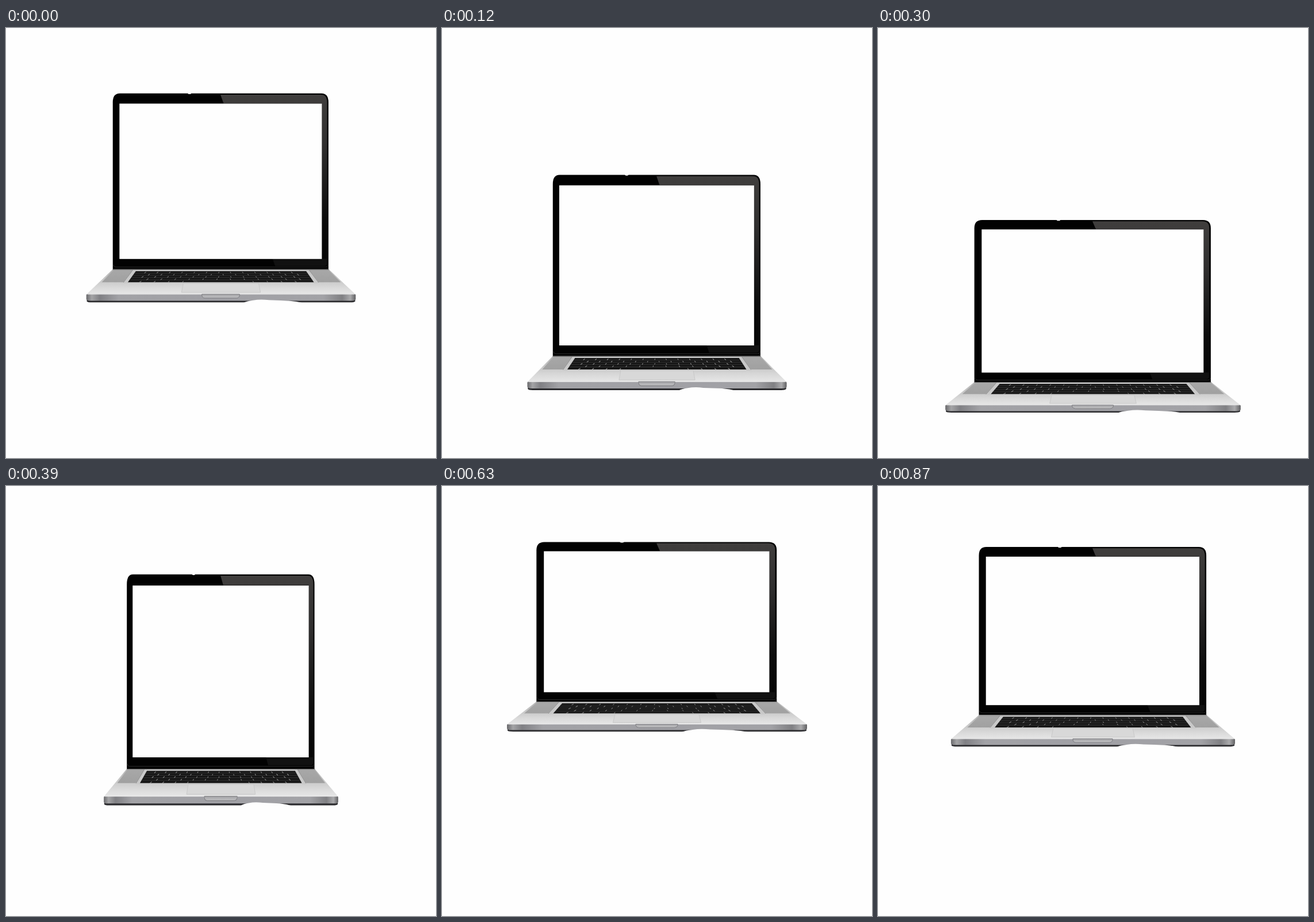
Animation of 748x748 px, one loop 0.9 s. Source, as an HTML page:

```html
<!DOCTYPE html>
<html lang="en">
<head>
<meta charset="utf-8">
<title>Bouncing laptop</title>
<style>
  html, body { margin: 0; width: 100%; height: 100%; overflow: hidden; background: #fefefe; }
  svg { display: block; width: 100%; height: 100%; }
</style>
</head>
<body>
<svg viewBox="0 0 748 748">
  <defs>
    <linearGradient id="gloss" x1="0" y1="0" x2="0" y2="1">
      <stop offset="0" stop-color="#403e3d"/>
      <stop offset=".3" stop-color="#302f2f"/>
      <stop offset=".75" stop-color="#0c0c0c"/>
      <stop offset="1" stop-color="#050505"/>
    </linearGradient>
    <linearGradient id="deck" x1="0" y1="0" x2="0" y2="1">
      <stop offset="0" stop-color="#b4b4b4"/>
      <stop offset=".5" stop-color="#cbcbcb"/>
      <stop offset=".75" stop-color="#dadada"/>
      <stop offset="1" stop-color="#e6e6e6"/>
    </linearGradient>
    <linearGradient id="side" x1="0" y1="0" x2="0" y2="1">
      <stop offset="0" stop-color="#a8a8a8"/>
      <stop offset="1" stop-color="#a0a0a0"/>
    </linearGradient>
    <linearGradient id="front">
      <stop offset="0" stop-color="#6a6a6d"/>
      <stop offset=".02" stop-color="#a4a4a6"/>
      <stop offset=".05" stop-color="#808084"/>
      <stop offset=".12" stop-color="#a2a2a6"/>
      <stop offset=".5" stop-color="#a0a0a5"/>
      <stop offset=".88" stop-color="#a2a2a6"/>
      <stop offset=".95" stop-color="#808083"/>
      <stop offset=".98" stop-color="#aaaaac"/>
      <stop offset="1" stop-color="#606062"/>
    </linearGradient>
    <linearGradient id="notch" x1="0" y1="0" x2="0" y2="1">
      <stop offset="0" stop-color="#a2a2a5"/>
      <stop offset="1" stop-color="#c2c2c4"/>
    </linearGradient>
  </defs>
  <g id="laptop">
    <!-- lid -->
    <path d="M164.3 375V111.5Q164.3 97.5 178 97.5H568.5Q582.2 97.5 582.2 111.5V375Z" fill="#020202"/>
    <path d="M373 99.5H567.5Q579.5 99.5 579.5 111.5V359H569V113H379Z" fill="url(#gloss)"/>
    <path d="M474 358.5H579V366Q579 370 574 370H479Z" fill="#111"/>
    <path d="M165.5 368Q166 371.5 171 371.5H576Q581 371.5 581.5 368" fill="none" stroke="#343434" stroke-width=".8"/>
    <path d="M309 97H317L315 98.6H311Z" fill="#fefefe"/>
    <rect x="177.2" y="113.5" width="392.2" height="245.2" fill="#fefefe"/>
    <!-- deck -->
    <path d="M164 375.3H583L634 414H114Z" fill="url(#deck)"/>
    <path d="M166 376H203L185 395.5H143ZM545 376H582L606 395.5H563Z" fill="url(#side)"/>
    <path d="M204 376H543L562 397H186Z" fill="#c9c9c9"/>
    <path d="M203 376L185 396M545 376L563 396" stroke="#8a8a8a" stroke-width=".8"/>
    <path d="M164 375.6H583" stroke="#777" stroke-width="1"/>
    <path d="M209 378H539L554 395.5H193.5Z" fill="#161616"/>
    <path id="rows" stroke="#3b3b3b" stroke-width=".8"/>
    <path id="ticks" stroke="#a4a4a4" stroke-width=".9"/>
    <path d="M301 397.2H447L450.5 411.5H297.5Z" fill="#d8d8d8" stroke="#c4c4c4" stroke-width=".8"/>
    <!-- front edge -->
    <path d="M114 421H634V425.5Q632 427.2 624 427.2H124Q115 427.2 114 425.5Z" fill="#2c2c2f"/>
    <path d="M113 416Q113 414 116 414H632Q635 414 635 416V422Q634 424.6 628 424.6H120Q114 424.6 113 422Z" fill="url(#front)"/>
    <path d="M115 414.2H633" stroke="#ededed" stroke-width="1"/>
    <path d="M337 414.3H410V416.5Q409 420.4 404 420.4H343Q338 420.4 337 416.5Z" fill="url(#notch)" stroke="#77777b" stroke-width=".9"/>
    <path d="M417 428Q424 425 436 424Q450 421.8 467 423.6L505 424.6L520 426L532 428Z" fill="#fefefe"/>
  </g>
</svg>
<script>
const LOOP = 900, STEP = 30, DROP = 267;
const CX = 374, CY = 262.25;
const $ = id => document.getElementById(id);

// keyboard: rows narrow towards the hinge
const edges = [378, 381, 384.4, 387.9, 391.6, 395.5];
const at = (f, y) => {
  const d = (y - 378) / 17.5;
  return 209 - 15.5 * d + f * (330 + 30.5 * d);
};
let rows = '', ticks = '';
edges.slice(1).forEach((y, r) => {
  const top = edges[r], n = 14 - (r > 2);
  if (r < 4) rows += `M${at(0, y)} ${y}H${at(1, y)}`;
  for (let i = 1; i < n; i++) {
    const f = (i + (r % 2) * .4 - .2) / n;
    if (r === 4 && f > .31 && f < .62) continue;
    ticks += `M${at(f, y)} ${y}L${at(f, top) + (f < .5 ? 1 : -1)} ${y - 1.9}`;
  }
});
$('rows').setAttribute('d', rows);
$('ticks').setAttribute('d', ticks);

// cubic-bezier(x1, 0, x2, 1)
function ease(x, x1, x2) {
  let lo = 0, hi = 1, u = .5;
  for (let i = 0; i < 24; i++) {
    u = (lo + hi) / 2;
    const v = 1 - u;
    if (3 * x1 * u * v * v + 3 * x2 * u * u * v + u * u * u < x) lo = u; else hi = u;
  }
  return u * u * (3 - 2 * u);
}

// keys: [time, value, x1, x2], the easing leads to the next key
const fall = [[240, DROP, .38, .29], [570, 0, 0, 1], [780, 0, .68, .7], [1110, DROP]];
const squash = [[240, .127, .4, .6], [375, -.223, .33, .3], [580, 0, 0, 1],
  [750, 0, .78, .66], [975, -.203, .5, .5], [1110, .127]];

function value(keys, t) {
  const i = keys.findIndex(k => k[0] > t);
  if (i < 0) return keys[keys.length - 1][1];
  const [t0, a, x1, x2] = keys[i - 1], [t1, b] = keys[i];
  return a + (b - a) * ease((t - t0) / (t1 - t0), x1, x2);
}

function draw() {
  let t = Math.floor(performance.now() % LOOP / STEP) * STEP;
  if (t < 240) t += LOOP;
  const k = value(squash, t), y = CY + value(fall, t);
  $('laptop').setAttribute('transform',
    `translate(${CX} ${y}) scale(${1 + k} ${1 - k}) translate(${-CX} ${-CY})`);
  requestAnimationFrame(draw);
}
draw();
</script>
</body>
</html>
```
